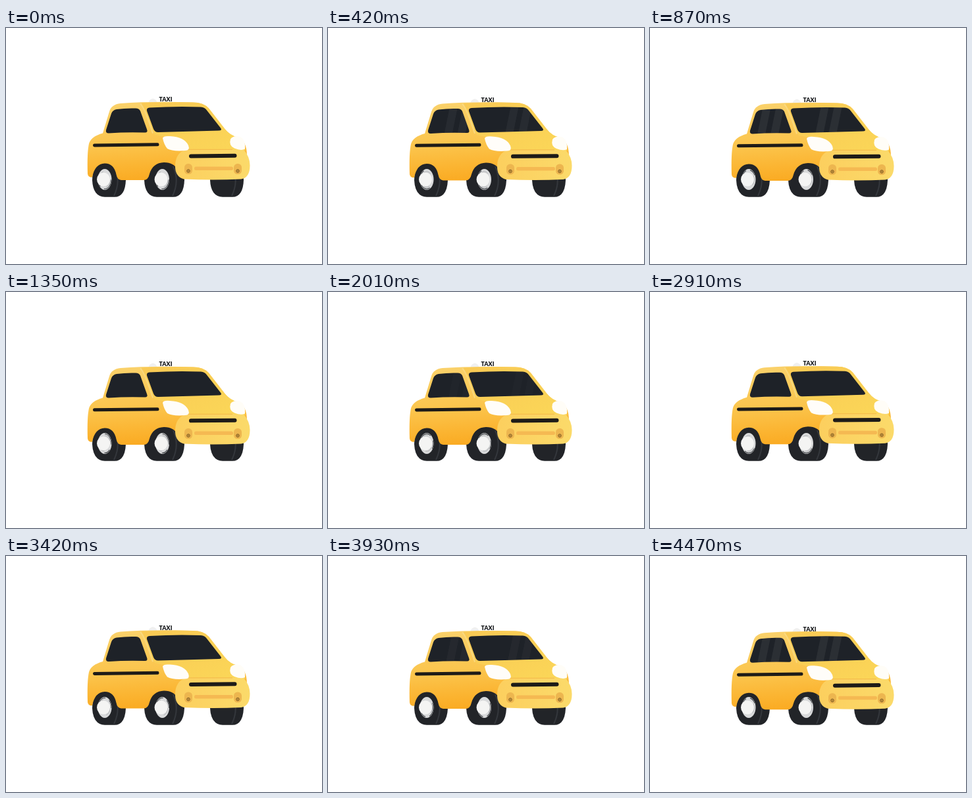
Animation of 480 by 360 pixels, one loop 4500 ms. Source, as an HTML page:

```html
<!DOCTYPE html>
<html lang="en">
<head>
<meta charset="utf-8">
<title>Taxi</title>
<style>
  html, body { margin: 0; width: 100%; height: 100%; overflow: hidden; background: #fff; }
  svg { display: block; width: 100vw; height: 100vh; }
  text { font: 900 8.8px Lato, "Open Sans", sans-serif; fill: #17191c; }
</style>
</head>
<body>
<svg viewBox="0 0 480 360">
  <defs>
    <linearGradient id="side" x1="0.35" y1="0" x2="0.5" y2="1">
      <stop offset="0" stop-color="#fad16a"/>
      <stop offset="0.5" stop-color="#fbc54d"/>
      <stop offset="0.8" stop-color="#fbb431"/>
      <stop offset="1" stop-color="#faa920"/>
    </linearGradient>
    <linearGradient id="hood" x1="0" y1="0" x2="1" y2="1">
      <stop offset="0" stop-color="#f9c954"/>
      <stop offset="1" stop-color="#fbd758"/>
    </linearGradient>
    <linearGradient id="bumper" x1="0" y1="0" x2="1" y2="0">
      <stop offset="0" stop-color="#fccf5e"/>
      <stop offset="1" stop-color="#fbda6a"/>
    </linearGradient>
    <path id="rear" d="M168 123.500 Q182 121.500 197 122 Q202 122 204 126 L214 154 Q216 159 211 159 Q183 158 156 160 Q151 160 152 155 L160 130 Q162 124.500 168 123.500Z"/>
    <path id="front" d="M218 121 Q258 118.500 296 120 Q302 120.500 305 125 L326 152 Q329 156 323 156 Q278 157 231 158.500 Q226 158.500 224 153.500 L214 126 Q213 121.500 218 121Z"/>
    <clipPath id="rearClip"><use href="#rear"/></clipPath>
    <clipPath id="frontClip"><use href="#front"/></clipPath>
    <g id="streaks" fill="#fff">
      <path d="M-7 112 H5 L-6 166 H-18Z"/>
      <path d="M13 112 H25 L14 166 H2Z"/>
    </g>
  </defs>

  <g id="tyres" fill="#222428"></g>
  <g id="body">
    <path d="M216 115 Q217 108 223 107 Q229 108 230 115Z" fill="#f0f0f0"/>
    <text x="232.600" y="111.700">TAXI</text>
    <path d="M124 222 Q123 190 126 176 Q129 165 147 160 L157 127 Q160 116 174 114.500 Q220 111 284 113 Q300 113 308 122 L332 153 Q340 164 352 166 Q366 171 366 195 V215 H259 Q256 205 240 204.500 Q223 205 218 222 Q216 231.500 209 231.500 H175 Q169 231 167.500 223 Q164 206 150 206 Q135 206.500 131 227 Q125 228 124 222Z" fill="url(#side)"/>
    <path d="M206 114 Q250 111.500 284 113 Q300 113 308 122 L332 153 Q341 164 352 166 L364 186 H272 Q270 168 239 165 L226 162 Q221 154 207 119Z" fill="url(#hood)"/>
    <path d="M204 115 Q210 119 223 160" fill="none" stroke="#fbdc88" stroke-width="2" opacity=".8"/>
    <use href="#rear" fill="#1e2228"/>
    <use href="#front" fill="#1e2228"/>
    <g clip-path="url(#rearClip)"><use id="glareRear" href="#streaks"/></g>
    <g clip-path="url(#frontClip)"><use id="glareFront" href="#streaks"/></g>
    <path d="M134.500 178.300 L230 177.200" stroke="#1d1b18" stroke-width="5" stroke-linecap="round"/>
    <path d="M273 185 H361 Q370.500 196 370.500 209 Q370.500 228 357 230 Q315 232 270 230 Q256 226 257 208 Q258 190 273 185Z" fill="url(#bumper)"/>
    <path d="M274 184.800 H344" stroke="#f5bd4c" stroke-width="1.200"/>
    <path d="M238 167.500 Q239 163.500 249 164.500 Q271 165.500 277 178.500 Q280 186.500 272 186.500 Q253 188 245 183.500 Q240 177.500 238 167.500Z" fill="#fffdf9"/>
    <path d="M341 169 Q345 163 355 165 Q364 169 363 184 Q357 187 347 183 Q338 179 341 169Z" fill="#fffdf7"/>
    <path d="M281 194.800 L347.500 194.200" stroke="#1d1b18" stroke-width="6" stroke-linecap="round"/>
    <rect x="286" y="211" width="59" height="5.500" rx="2.500" fill="#f5b952"/>
    <g id="fog"></g>
  </g>
  <g id="hubs"></g>
</svg>
<script>
const LOOP = 4500, BOB = 480, SWEEP = 1800;
const $ = id => document.getElementById(id);
const clamp = v => Math.max(0, Math.min(1, v));

const tyre = (l, r) => `<path d="M${l} 232 Q${l} 203 ${l + 22} 203 H${r - 22} Q${r} 204 ${r} 232 Q${r - 1} 257.800 ${r - 17} 257.800 H${l + 19} Q${l + 1} 257 ${l} 232Z"/>
  <path d="M${r - 17} 211 Q${r - 7} 233 ${r - 18} 256" fill="none" stroke="#34373c" stroke-width="2"/>`;
$("tyres").innerHTML = tyre(131, 182) + tyre(210, 271) + tyre(310, 361);

const lamp = x => `<rect x="${x - 6}" y="206.500" width="12" height="16" rx="5.500" fill="#edb64f"/>
  <circle cx="${x}" cy="217.500" r="2.300" fill="#d6a045" stroke="#7d5c23" stroke-width="1"/>
  <circle cx="${x}" cy="217.500" r=".7" fill="#5d451c"/>`;
$("fog").innerHTML = lamp(277) + lamp(352);

const hub = x => `<g transform="translate(${x} 231)">
  <ellipse rx="10.500" ry="16" fill="#d9dadb"/>
  <g transform="scale(.68 1)"><g class="spin">
    <circle r="14.500" fill="none" stroke="#3c3f43" stroke-width="1.200" stroke-dasharray="24 9 13 45"/>
    <circle r="12" fill="none" stroke="#a3a5a8" stroke-width=".8" stroke-dasharray="15 22.700"/>
  </g></g>
  <ellipse cx="-2" rx="10" ry="10.500" fill="#f4f4f3"/></g>`;
$("hubs").innerHTML = hub(150) + hub(237.5);
const spins = document.querySelectorAll(".spin");

function glare(id, x, alpha) {
  $(id).setAttribute("transform", `translate(${x} 0)`);
  $(id).setAttribute("opacity", alpha);
}

function draw(t) {
  const bob = 0.6 + 1.6 * (1 - Math.cos(2 * Math.PI * t / BOB));
  $("body").setAttribute("transform", `translate(0 ${bob})`);
  spins.forEach(s => s.setAttribute("transform", `rotate(${t})`));

  // Light runs backwards over the glass, then fades away
  const s = (t + 1830) % SWEEP - 900;
  const alpha = 0.06 * clamp((s + 800) / 500) * clamp((240 - s) / 200);
  glare("glareRear", 180 - s * 0.03, alpha);
  glare("glareFront", 268 - s * 0.04, alpha);
}

const start = performance.now();
function tick() {
  draw((performance.now() - start) % LOOP);
  requestAnimationFrame(tick);
}
draw(0);
requestAnimationFrame(tick);
</script>
</body>
</html>
```
